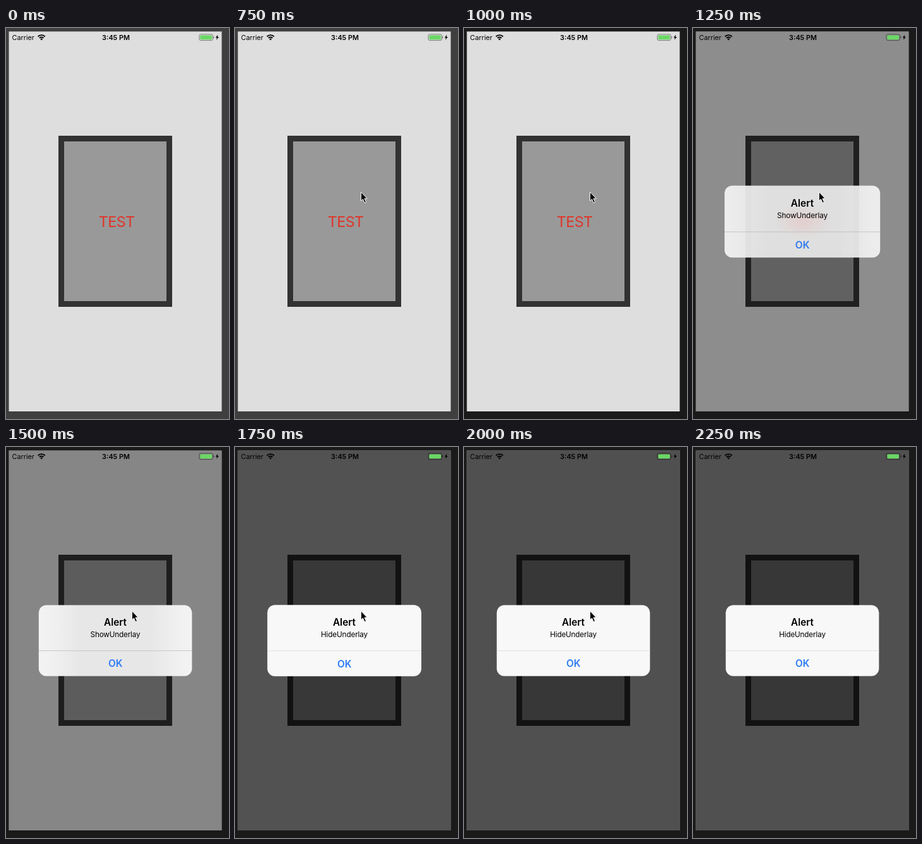
Animation of 353 by 617 pixels, one loop 3250 ms. Source, as an HTML page:

```html
<!DOCTYPE html>
<html lang="en">
<head>
<meta charset="utf-8">
<style>
  html, body { margin: 0; width: 100%; height: 100%; overflow: hidden; background: #1a1a1a; }
  svg { display: block; }
  text { font-family: Inter, Roboto, sans-serif; }
  .mid { text-anchor: middle; }
  .bold { font-weight: 600; }
</style>
</head>
<body>
<svg width="353" height="617" viewBox="0 0 353 617">
  <defs>
    <linearGradient id="glass">
      <stop offset="0" stop-color="#f3f3f3"/>
      <stop offset=".1" stop-color="#f0f0f0"/>
      <stop offset=".27" stop-color="#e7e7e7"/>
      <stop offset=".73" stop-color="#e7e7e7"/>
      <stop offset=".9" stop-color="#f0f0f0"/>
      <stop offset="1" stop-color="#f3f3f3"/>
    </linearGradient>
    <radialGradient id="blush">
      <stop offset="0" stop-color="#ff5a50" stop-opacity=".11"/>
      <stop offset="1" stop-color="#ff5a50" stop-opacity="0"/>
    </radialGradient>
  </defs>

  <rect id="desk" width="353" height="617"/>
  <rect x="4.5" y="5.5" width="337" height="599.5" fill="#dedede"/>
  <rect x="83" y="170" width="180" height="270" fill="#323232"/>
  <rect x="92" y="179" width="162" height="252" fill="#999"/>
  <text class="mid" x="175.2" y="314.3" font-size="23.4" letter-spacing="-.6" fill="#e0352b">TEST</text>
  <rect id="dim" x="4.5" y="5.5" width="337" height="599.5"/>

  <g id="status">
    <text x="9.6" y="18.8" font-size="10.8">Carrier</text>
    <text class="mid bold" x="174" y="18.8" font-size="10.8">3:45 PM</text>
    <g fill="none" stroke="#000" stroke-width="1.9">
      <path d="M50.6 13.5A7.9 7.9 0 0 1 61.8 13.5"/>
      <path d="M52.9 15.9A4.6 4.6 0 0 1 59.5 15.9"/>
    </g>
    <path d="M56.2 19.4L54.3 17.4A2.7 2.7 0 0 1 58.1 17.4Z"/>
    <rect x="306" y="10" width="21.4" height="9.6" rx="2.4" fill="none" stroke="#000" stroke-opacity=".45"/>
    <path d="M328.3 13.2q1.3 .4 1.3 1.6t-1.3 1.6z" fill-opacity=".5"/>
    <rect x="307.4" y="11.4" width="18.6" height="6.8" rx="1.2" fill="#6bd765"/>
    <path d="M335.4 10.5L331.8 15.2H333.9L333 18.8L337 13.9H334.7Z"/>
  </g>

  <g id="alert">
    <rect id="panel" x="51.8" y="249.5" width="242.6" height="112" rx="12"/>
    <ellipse id="glow" cx="174" cy="306" rx="46" ry="26" fill="url(#blush)"/>
    <path id="rule" d="M51.8 321.5H294.4"/>
    <text class="mid bold" x="173" y="281.9" font-size="15.3">Alert</text>
    <text class="mid" id="message" x="173" y="300" font-size="11.7" letter-spacing="-.15"></text>
    <text class="mid bold" x="173.2" y="347.4" font-size="15.3" fill="#2f7cf6">OK</text>
  </g>

  <path id="cursor" d="M199.4 258.8V272.9L202.5 270L205 275.9L207.5 274.8L205 269.1H209.3Z"
        stroke="#fff" stroke-width="1" stroke-linejoin="round"/>
</svg>
<script>
  const LOOP = 3250;
  const CENTER = [173.1, 305.5];
  const $ = id => document.getElementById(id);
  const set = (id, attrs) => {
    for (const [key, value] of Object.entries(attrs)) $(id).setAttribute(key, value);
  };

  // Screen states, each held until the next one begins.
  const states = [
    { at: 0, dim: 0 },
    { at: 1250, dim: .365, text: "ShowUnderlay", scale: 1.015, alpha: .94 },
    { at: 1500, dim: .4, text: "ShowUnderlay", scale: 1, alpha: 1 },
    { at: 1750, dim: .632, text: "HideUnderlay", scale: 1.005, alpha: 1 },
    { at: 2000, dim: .64, text: "HideUnderlay", scale: 1, alpha: 1 }
  ];

  function draw(t) {
    const s = states.filter(state => state.at <= t).pop();
    const hiding = s.text === "HideUnderlay";
    set("desk", { fill: t < 1000 ? "#3f3f3f" : "#1a1a1a" });
    set("dim", { opacity: s.dim });
    set("cursor", { visibility: t >= 750 && t < 2250 ? "visible" : "hidden" });
    set("alert", { display: s.text ? "inline" : "none" });
    if (!s.text) return;
    const [x, y] = CENTER;
    set("alert", {
      opacity: s.alpha,
      transform: `translate(${x} ${y}) scale(${s.scale}) translate(${-x} ${-y})`
    });
    set("panel", { fill: hiding ? "#f8f8f8" : "url(#glass)" });
    set("rule", { stroke: hiding ? "#e2e2e2" : "#c8c8c8" });
    set("glow", { visibility: s.alpha < 1 ? "visible" : "hidden" });
    $("message").textContent = s.text;
  }

  const start = performance.now();
  function tick() {
    draw((performance.now() - start) % LOOP);
    requestAnimationFrame(tick);
  }
  tick();
</script>
</body>
</html>
```
